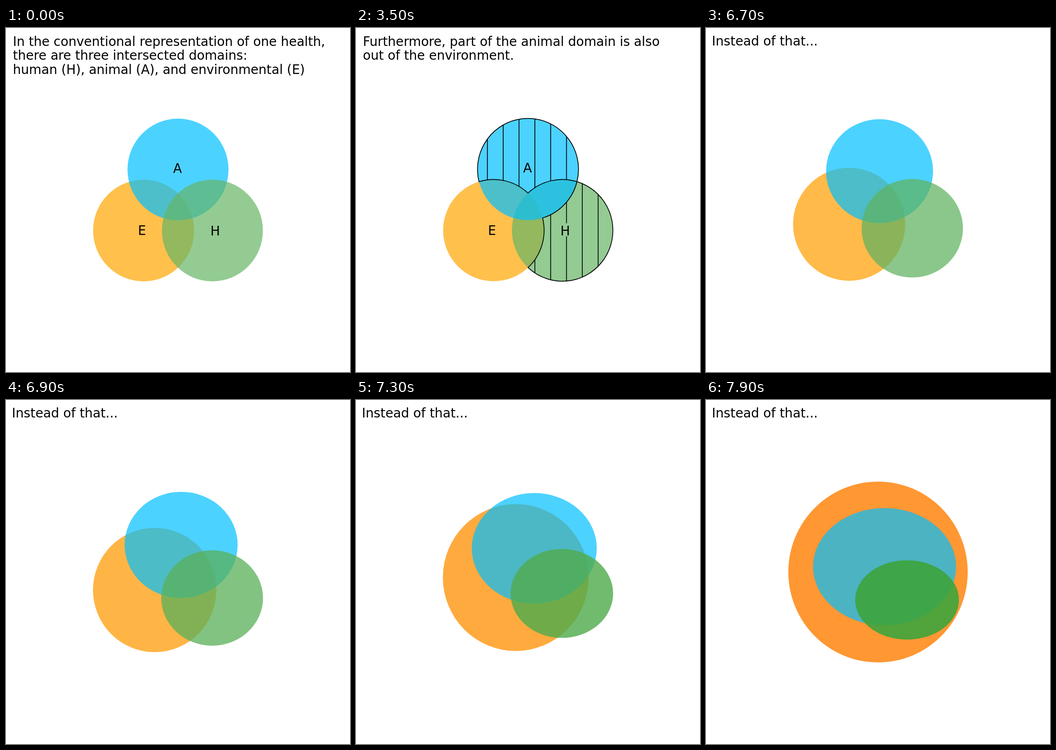
An HTML page with a canvas that plays this animation: 748 px wide and 748 px high, repeating every 8 s.

```html
<!DOCTYPE html>
<html lang="en">
<head>
<meta charset="utf-8">
<title>One health domains</title>
<style>
  html, body { margin: 0; width: 100%; height: 100%; overflow: hidden; background: #fff; }
  canvas { display: block; width: 100vw; height: 100vh; }
</style>
</head>
<body>
<canvas id="stage" width="748" height="748"></canvas>
<script>
const SIZE = 748, LOOP = 8000, MORPH_START = 6500, STEP = 100, STEPS = 14;
const ctx = document.getElementById('stage').getContext('2d');

// Ellipses: centre, radii, fill as [r, g, b, alpha]
const venn = {
  E: { x: 299.2, y: 440.4, rx: 109.8, ry: 110.6, fill: [255, 165, 0, 0.7] },
  A: { x: 374, y: 307.6, rx: 109.8, ry: 110.6, fill: [0, 191, 255, 0.7] },
  H: { x: 448.8, y: 440.4, rx: 109.8, ry: 110.6, fill: [102, 181, 102, 0.7] }
};
const nested = {
  E: { x: 374, y: 374, rx: 195, ry: 196.6, fill: [255, 126, 0, 0.8] },
  A: { x: 388.3, y: 362.5, rx: 155.5, ry: 127.4, fill: [0, 191, 255, 0.7] },
  H: { x: 437.2, y: 434.7, rx: 112.8, ry: 86.3, fill: [63, 165, 60, 0.9] }
};

const scenes = [
  { until: 500, hatch: '', order: 'EAH', text: [
    'In the conventional representation of one health,',
    'there are three intersected domains:',
    'human (H), animal (A), and environmental (E)'] },
  { until: 3500, hatch: 'H', order: 'EHA', text: [
    'Here is one of the problems! Part of the human',
    'domain is out of the environment, and it is not',
    'animal.'] },
  { until: 6500, hatch: 'HA', order: 'EHA', text: [
    'Furthermore, part of the animal domain is also',
    'out of the environment.'] }
];

const lerp = (a, b, p) => a + (b - a) * p;

function mix(a, b, p) {
  const out = { fill: a.fill.map((v, i) => lerp(v, b.fill[i], p)) };
  for (const k of ['x', 'y', 'rx', 'ry']) out[k] = lerp(a[k], b[k], p);
  return out;
}

function ellipsePath(s) {
  const path = new Path2D();
  path.ellipse(s.x, s.y, s.rx, s.ry, 0, 0, Math.PI * 2);
  return path;
}

function drawShape(s) {
  ctx.fillStyle = `rgba(${s.fill.join(',')})`;
  ctx.fill(ellipsePath(s));
}

function drawText(lines, x, y, size = 27.65) {
  ctx.font = `${size}px "DejaVu Sans", sans-serif`;
  ctx.fillStyle = '#000';
  lines.forEach((line, i) => ctx.fillText(line, x, y + i * 30.2));
}

// Angle of point (x, y) on the ellipse s
const angle = (s, x, y) => Math.atan2((y - s.y) / s.ry, (x - s.x) / s.rx);

// Closed outline made of arcs: [ellipse, from, to, counterclockwise]
function region(arcs) {
  const path = new Path2D();
  for (const [s, from, to, ccw] of arcs) {
    path.ellipse(s.x, s.y, s.rx, s.ry, 0, angle(s, ...from), angle(s, ...to), ccw);
  }
  path.closePath();
  return path;
}

const { E, A, H } = venn;
const inner = [406, 413.5], right = [480.5, 334.4], low = [374, 521.3];
const left = [267.4, 334.4], mid = [374, 359.3];
const regions = {
  H: region([[E, low, inner, true], [A, inner, right, true], [H, right, low, false]]),
  A: region([[A, left, right, false], [H, right, mid, true], [E, mid, left, true]])
};

function drawHatch(name) {
  ctx.strokeStyle = '#000';
  ctx.lineWidth = 1.7;
  ctx.lineJoin = 'round';
  ctx.save();
  ctx.clip(regions[name]);
  ctx.beginPath();
  for (let k = 0; k < 8; k++) {
    const x = 285.7 + 34.4 * k;
    ctx.moveTo(x, 190);
    if (k === 5) {
      // gap around the letter H
      ctx.lineTo(x, 425);
      ctx.moveTo(x, 453.5);
    }
    ctx.lineTo(x, 560);
  }
  ctx.stroke();
  ctx.restore();
  ctx.stroke(regions[name]);
}

function drawScene(scene) {
  const lift = scene.hatch ? 0.4 : 0;
  ctx.save();
  ctx.translate(0, -lift);
  for (const k of scene.order) drawShape(venn[k]);
  for (const k of scene.hatch) drawHatch(k);
  ctx.textAlign = 'center';
  drawText(['A'], 373, 315 - lift);
  drawText(['E'], 295.8, 450.3 - lift);
  drawText(['H'], 455, 451.3 - lift);
  ctx.restore();
  drawText(scene.text, 15, 39.2);
}

// Linear morph; the view stays centred on the box around all shapes
function drawMorph(p) {
  const shapes = [...'EAH'].map(k => mix(venn[k], nested[k], p));
  const offset = (c, r) => SIZE / 2 -
    (Math.min(...shapes.map(s => s[c] - s[r])) + Math.max(...shapes.map(s => s[c] + s[r]))) / 2;
  ctx.save();
  ctx.translate(offset('x', 'rx'), offset('y', 'ry'));
  shapes.forEach(drawShape);
  ctx.restore();
  drawText(['Instead of that...'], 12.7, 38.3, 27.8);
}

function frame(now) {
  const t = now % LOOP;
  ctx.fillStyle = '#fff';
  ctx.fillRect(0, 0, SIZE, SIZE);
  const scene = scenes.find(s => t < s.until);
  if (scene) drawScene(scene);
  else drawMorph(Math.floor((t - MORPH_START) / STEP) / STEPS);
}

const start = performance.now();
function tick() {
  frame(performance.now() - start);
  requestAnimationFrame(tick);
}
tick();
</script>
</body>
</html>
```
